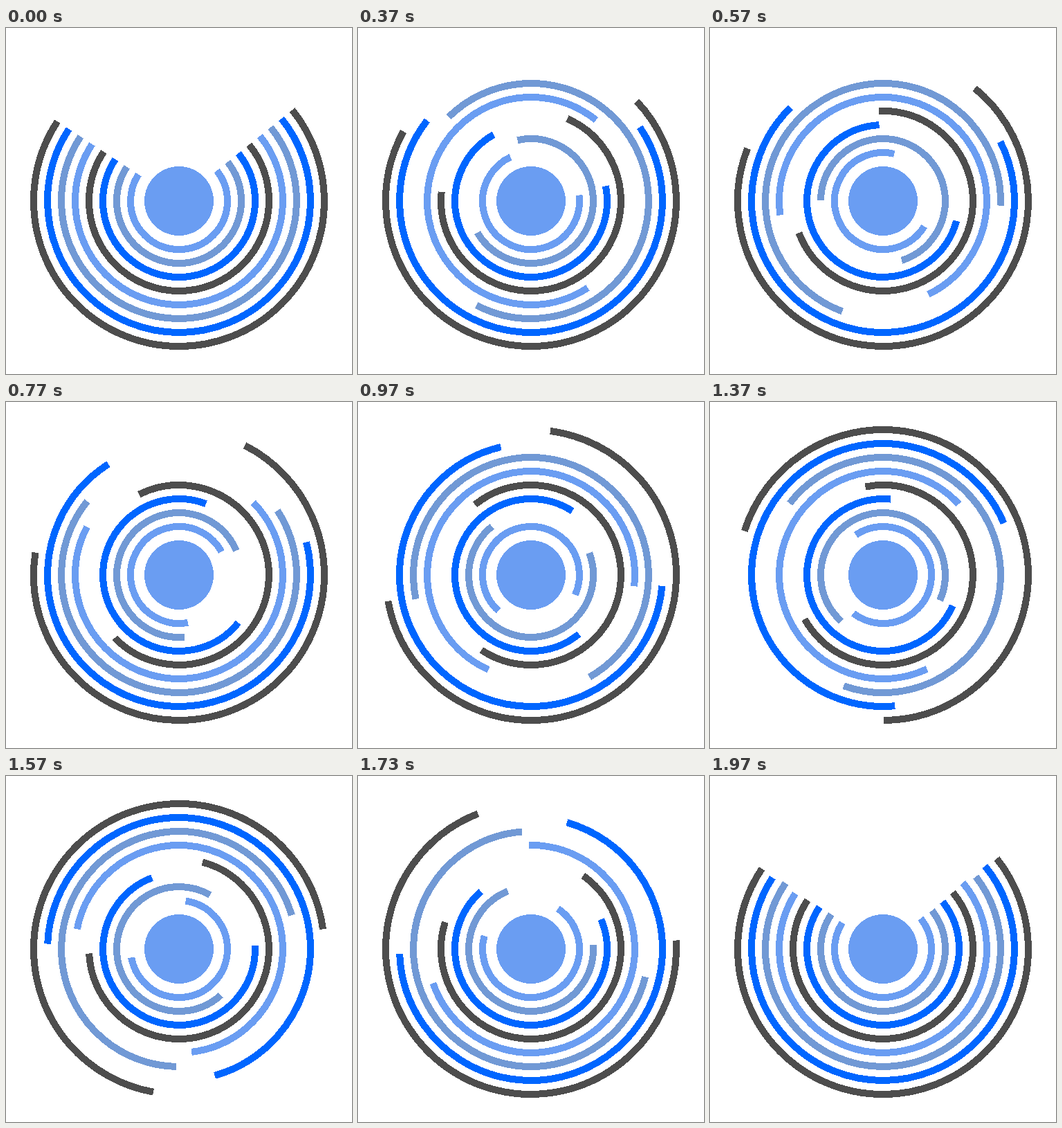
Recreate the animation shown at these times as an HTML page without scripts. Size 500 by 500 pixels, loop 2000 ms.

```html
<!DOCTYPE html>
<html lang="en">
<head>
<meta charset="utf-8">
<title>Rings</title>
<style>
@property --t { syntax: "<number>"; inherits: true; initial-value: 0; }

html, body { margin: 0; width: 100%; height: 100%; overflow: hidden; background: #fff; }

svg {
  display: block;
  width: 100vw;
  height: 100vh;
  animation: clock 2s steps(60) -4ms infinite;

  /* ease in and out */
  --ease: calc(var(--t) * var(--t) * (3 - 2 * var(--t)));

  /* quarter turn there and back */
  --m: min(2 * var(--t), 2 - 2 * var(--t));
  --swing: calc(var(--m) * var(--m) * (3 - 2 * var(--m)) / 4);

  /* late rush: cubic-bezier(1, 0, .667, 1) solved for its parameter */
  --h: calc((var(--t) - 22 / 27) / 4);
  --d: sqrt(var(--h) * var(--h) + 1 / 5832);
  --s: calc(2 / 3 + pow(var(--d) + var(--h), 1 / 3) - pow(var(--d) - var(--h), 1 / 3));
  --rush: calc(var(--s) * var(--s) * (3 - 2 * var(--s)));
}
@keyframes clock { from { --t: 0; } to { --t: 1; } }

.ring {
  fill: none;
  stroke-width: 10;
  stroke-dasharray: 252 108;
  stroke-dashoffset: 38.8;
  transform-origin: 0 0;
  transform: rotate(calc(var(--turn) * 1turn));
}
.sky { stroke: #6a9df2; }
.steel { stroke: #7199d5; }
.blue { stroke: #0066ff; }
.gray { stroke: #4d4d4d; }

.r1 { --turn: var(--ease); }
.r2 { --turn: -2 * var(--ease); }
.r3 { --turn: var(--swing); }
.r4 { --turn: -1 * var(--swing); }
.r5 { --turn: 3 * var(--ease); }
.r6 { --turn: -3 * var(--ease); }
.r7 { --turn: var(--rush); }
.r8 { --turn: -1 * var(--rush); }
</style>
</head>
<body>
<svg viewBox="-250 -250 500 500" shape-rendering="crispEdges">
  <circle r="50" fill="#6a9df2"/>
  <circle class="ring sky r1" r="70" pathLength="360"/>
  <circle class="ring steel r2" r="90" pathLength="360"/>
  <circle class="ring blue r3" r="110" pathLength="360"/>
  <circle class="ring gray r4" r="130" pathLength="360"/>
  <circle class="ring sky r5" r="150" pathLength="360"/>
  <circle class="ring steel r6" r="170" pathLength="360"/>
  <circle class="ring blue r7" r="190" pathLength="360"/>
  <circle class="ring gray r8" r="210" pathLength="360"/>
</svg>
</body>
</html>
```
